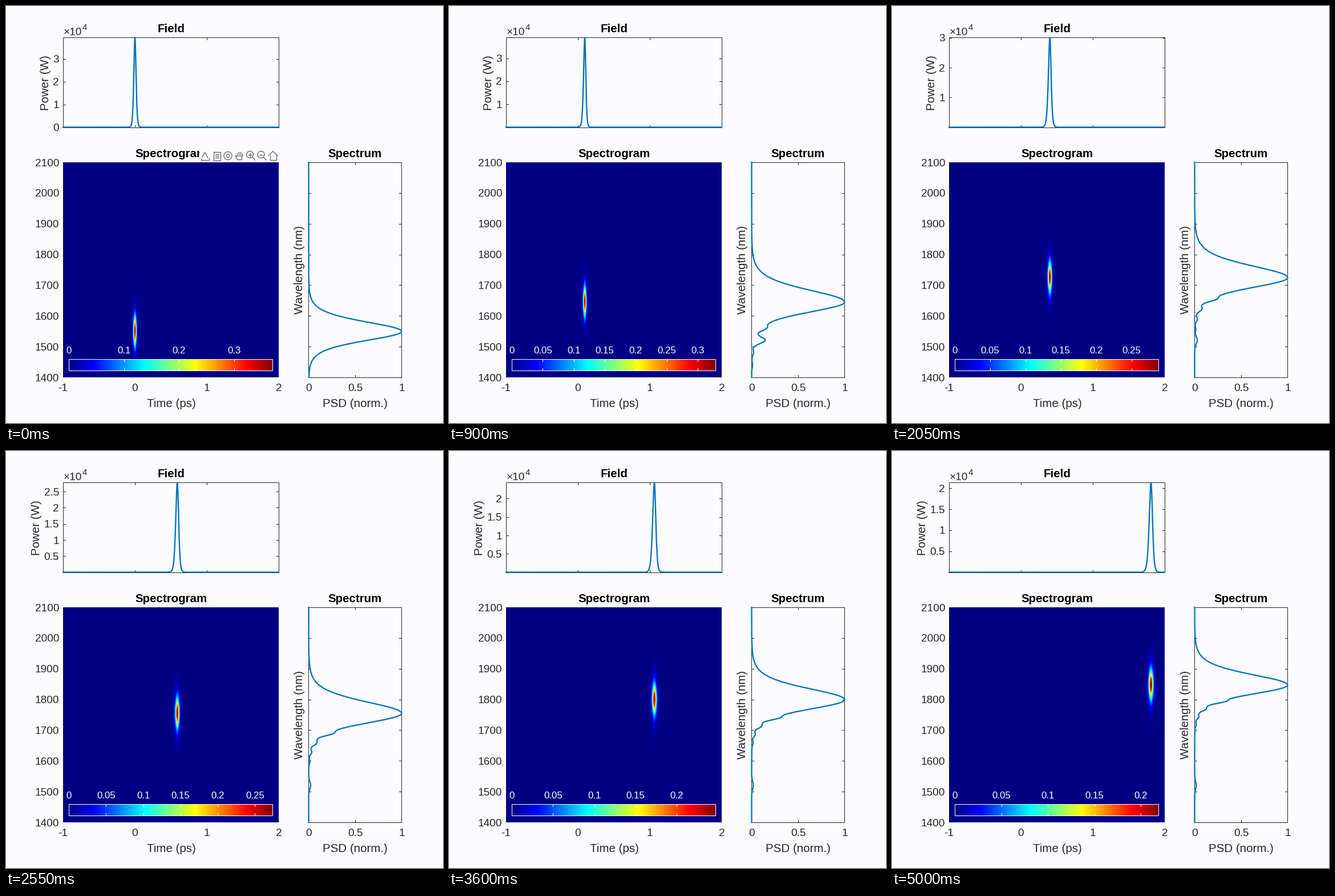
Animation, 766 px wide and 731 px high, one loop 5.05 s. Source, as a matplotlib script:

```python
import numpy as np
import matplotlib.pyplot as plt
from matplotlib.animation import FuncAnimation
from matplotlib.patches import Circle, Rectangle

W, H, DPI = 766, 731, 100
FRAMES, STEP_MS = 101, 50
PT = 72 / DPI

BACK = "#fcfcff"
INK = "#262626"
BLUE = "#0072bd"
ICON = "#5a5a5a"
TICK_SIZE, LABEL_SIZE, BAR_SIZE = 19, 20.5, 16.8

# Panels in pixels: left, top, right, bottom
FIELD = (100, 55, 478, 213)
GRAM = (100, 274, 478, 651)
SPEC = (530, 274, 693, 651)
BAR = (110, 619, 467, 639)

# The red shift is nearly straight on a logarithmic time scale
SHIFT_AT = np.array([0, 18, 32, 51, 63, 82, 100])
SHIFT_Y = [570.5, 519, 493, 460, 446, 426, 410.3]


def centre_y(k):
    return np.interp(np.log1p(k / 30), np.log1p(SHIFT_AT / 30), SHIFT_Y)


def delay_x(k):
    return 226 + k * (.156 + .02995 * k - .0000871 * k * k)


def peak_power(k):
    """Short compression, then a slow decay (in 10 kW)."""
    return 3.92 * ((k + 12) / 30) ** -.46 * (1 - .34 * np.exp(-k / 4))


def pulse_width(k):
    return (17.8 - .04 * k) / peak_power(k)


def gram_max(k):
    return .3695 / (1 + k / 145)


def bell(x, half):
    """sech^2 with the given half width at half height."""
    return 1 / np.cosh(np.clip(.8814 * x / half, -40, 40)) ** 2


def bump(x, width):
    return np.exp(-(x / width) ** 2)


def spectrum(k, y):
    d = y - centre_y(k)
    grown = 1 - np.exp(-k / 8)
    red = bell(d, 20.5 + 7 * grown - .05 * k)
    blue = bell(d, 19.5 + 3 * grown - .03 * k)
    gap = 12 + 14 * np.exp(-k / 45)
    lobes = sum(.08 * .5 ** n * bump(d - (2.15 + n) * gap, .3 * gap) for n in range(4))
    residue = (.017 + .45 * np.exp(-k / 11)) * bump(y - 586, 9)
    return np.where(d < 0, red, blue + grown * lobes) + grown * residue


def jet(v):
    v = (1 + 255 * v) / 256
    return np.stack([np.clip(1.5 - np.abs(4 * v - c), 0, 1) for c in (3, 2, 1)], -1)


fig = plt.figure(figsize=(W / DPI, H / DPI), dpi=DPI, facecolor=BACK)
ax = fig.add_axes([0, 0, 1, 1])
plt.rcParams["font.family"] = "Liberation Sans"


def text(x, y, s, size=TICK_SIZE, color=INK, ha="center", bold=False, up=False):
    """Text whose capitals are centred on (x, y)."""
    drop = .345 * size
    return ax.text(x + drop * up, y + drop * (not up), s, fontsize=size * PT,
                   color=color, ha=ha, va="baseline", rotation=90 * up,
                   rotation_mode="anchor", weight="bold" if bold else "normal",
                   zorder=6)


def stroke(xs, ys, color=INK, width=1, z=4):
    return ax.plot(xs, ys, color=color, lw=width * PT, zorder=z,
                   solid_joinstyle="round")[0]


def ticks_x(panel, x, color=INK):
    _, top, _, bottom = panel
    return [stroke([x, x], [top, top + 4], color),
            stroke([x, x], [bottom - 4, bottom], color)]


def ticks_y(panel, y):
    left, _, right, _ = panel
    return [stroke([left, left + 4], [y, y]), stroke([right - 4, right], [y, y])]


def frame(panel, color=INK):
    l, t, r, b = panel
    ax.add_patch(Rectangle((l, t), r - l, b - t, fill=False, ec=color,
                           lw=PT, zorder=4))


def picture(panel, data, z):
    l, t, r, b = panel
    return ax.imshow(data, extent=(l, r, b, t), aspect="auto",
                     interpolation="nearest", zorder=z)


def toolbar():
    """Seven small icons, each drawn around its own centre."""
    parts = [ax.add_patch(Rectangle((339, 250), 139.5, 23.5, fc=BACK, ec="none", zorder=7))]

    def line(cx, *pts):
        xs, ys = np.transpose(pts)
        parts.append(stroke(cx + xs, 262.5 + ys, ICON, 1.2, 8))

    def ring(cx, r, dy=0):
        parts.append(ax.add_patch(Circle((cx, 262.5 + dy), r, fill=False, ec=ICON,
                                         lw=1.2 * PT, zorder=8)))

    # export
    line(349, (-7, 4), (-7, 7), (7, 7), (7, 4))
    line(349, (-5, 2), (0, -6), (5, 4))
    # data tips
    line(370, (-6, -7), (6, -7), (6, 8), (-6, 8), (-6, -7))
    for dy in (-3, 0, 3):
        line(370, (-3, dy), (3, dy))
    # rotate
    ring(389, 7)
    ring(389, 3)
    # pan
    for dx in (-4, -1, 2, 5):
        line(409, (dx, -7 + abs(dx - .5) / 2), (dx, 0))
    line(409, (-4, 0), (-7, 0), (-3, 7), (4, 7), (5, 0))
    # zoom in and out
    for cx in (427.5, 447):
        ring(cx, 6, -2)
        line(cx, (4.5, 2.5), (9, 7.5))
        line(cx, (-3, -2), (3, -2))
    line(427.5, (0, -5), (0, 1))
    # home
    line(468, (-8, 0), (0, -8), (8, 0))
    line(468, (-5.5, -1), (-5.5, 7), (5.5, 7), (5.5, -1))
    return parts


# Fixed parts
for panel in (FIELD, SPEC):
    frame(panel)
text(289.5, 39, "Field", LABEL_SIZE, "black", bold=True)
text(289.5, 257.5, "Spectrogram", LABEL_SIZE, "black", bold=True)
text(611.5, 257.5, "Spectrum", LABEL_SIZE, "black", bold=True)
text(289.5, 696, "Time (ps)", LABEL_SIZE)
text(611.5, 696, "PSD (norm.)", LABEL_SIZE)
text(512.5, 462, "Wavelength (nm)", LABEL_SIZE, up=True)
text(100.5, 44, "×10", ha="left")
text(134, 37, "4", 15, ha="left")

for ps in range(-1, 3):
    text(226 + 126 * ps, 668.5, str(ps))
for x in (226, 352):
    ticks_x(FIELD, x)
for v in (0, .5, 1):
    text(530.5 + 163 * v, 668.5, f"{v:g}")
ticks_x(SPEC, 612)
for nm in range(1400, 2101, 100):
    y = 651 - (nm - 1400) * 377 / 700
    text(93, y, str(nm), ha="right")
    ticks_y(SPEC, y)

gx = np.arange(GRAM[0], GRAM[2]) + .5
gy = (np.arange(GRAM[1], GRAM[3]) + .5)[:, None]
gram = picture(GRAM, np.zeros((len(gy), len(gx), 3)), 2)
picture(BAR, jet(np.linspace(0, 1, 357))[None], 3)
frame(BAR, "white")

fx = np.linspace(FIELD[0], FIELD[2], 1513)
sy = np.linspace(SPEC[1], SPEC[3], 755)
field_line = stroke(fx, fx * 0, BLUE, 2.3, 5)
spec_line = stroke(sy * 0, sy, BLUE, 2.3, 5)
power = text(67.5, 134.5, "Power (W)", LABEL_SIZE, up=True)
power_x = power.get_position()[0]

ax.set_xlim(0, W)
ax.set_ylim(H, 0)
ax.axis("off")
live = []


def draw(k):
    while live:
        live.pop().remove()

    delay, peak, width, top = delay_x(k), peak_power(k), pulse_width(k), gram_max(k)

    # The travelling pulse grows a longer foot on its left
    skew = .14 * min(k / 18, 1)
    half = width / 2 * np.where(fx < delay, 1 + skew, 1 - skew / 3)
    field_line.set_ydata(212.5 - 157 * bell(fx - delay, half))
    spec_line.set_xdata(530.5 + 163 * spectrum(k, sy))
    gram.set_data(jet(bell(gx - delay, width / 2) * bell(gy - centre_y(k) + 1, 21)))

    step = 1 if peak >= 3 else .5
    power.set_x(power_x - (0 if step == 1 else 15.5))
    for v in np.arange(0 if k == 0 else step, peak, step):
        y = 212.5 - 157.5 * v / peak
        live.append(text(93, y, f"{v:g}", ha="right"))
        live.extend(ticks_y(FIELD, y))

    step = .1 if top > .35 else .05
    for v in np.arange(0, top, step):
        x = BAR[0] + 357 * v / top
        live.append(text(x, 603, f"{v:.2g}", BAR_SIZE, "white"))
        if v > 0:
            live.extend(ticks_x(BAR, x, "white"))

    if k == 0:
        live.extend(toolbar())
    return []


anim = FuncAnimation(fig, draw, frames=FRAMES, interval=STEP_MS,
                     init_func=lambda: [], repeat=True, repeat_delay=0, blit=False)
plt.show()
```
